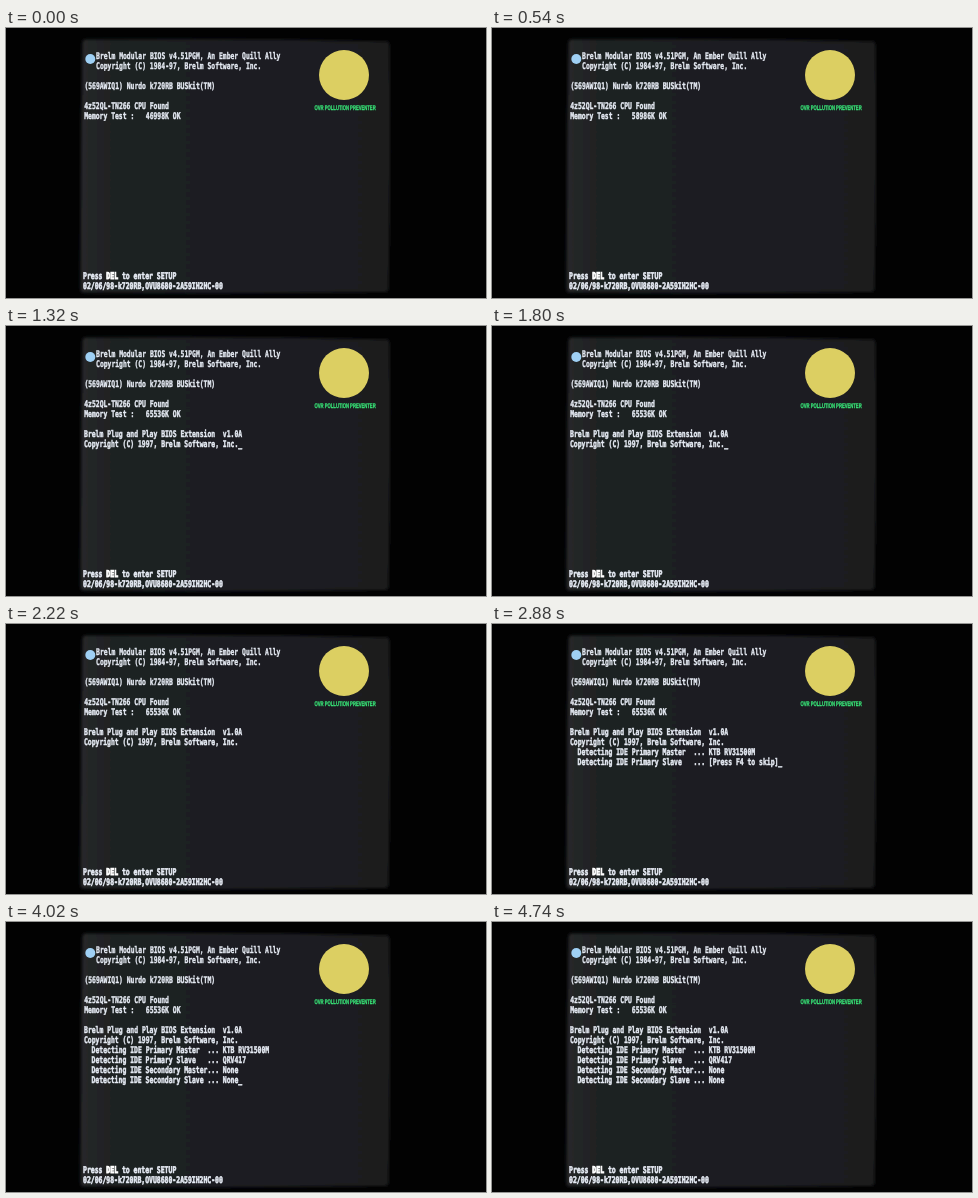
An HTML page that plays this animation: 480 px wide and 270 px high, repeating every 4.8 s.

```html
<!DOCTYPE html>
<html lang="en">
<head>
<meta charset="utf-8">
<title>Boot screen</title>
<style>
  html, body { margin: 0; width: 100%; height: 100%; overflow: hidden; background: #020202; }
  svg { display: block; width: 100vw; height: 100vh; }
  text { text-rendering: geometricPrecision; white-space: pre; }
  #lines text { font: bold 16.61px "DejaVu Sans Mono", monospace; fill: #e6ebf4; stroke: #e6ebf4; }
  #lines .hi { fill: #fff; stroke: #fff; stroke-width: 2px; }
  #label { font: bold 4.2px "Liberation Sans", Arial, sans-serif; fill: #38e678; stroke: #38e678; stroke-width: 0.2px; }
</style>
</head>
<body>
<svg viewBox="0 0 480 270">
  <defs>
    <filter id="soft" x="-5%" y="-5%" width="110%" height="110%">
      <feGaussianBlur stdDeviation="1.4"/>
    </filter>
    <linearGradient id="glass">
      <stop offset="0" stop-color="#26282a"/>
      <stop offset="0.12" stop-color="#1e2021"/>
      <stop offset="1" stop-color="#1c1d1f"/>
    </linearGradient>
  </defs>
  <rect width="480" height="270" fill="#020202"/>
  <path filter="url(#soft)" fill="url(#glass)"
    d="M79 11.5Q230 10 381 13.5Q383.5 14 383.5 18Q385 140 382.5 261Q382 264 378 264Q230 266 77 264.5Q74.5 264 74.5 260Q74.5 130 76.5 15Q76.5 12 79 11.5Z"/>
  <circle cx="84.3" cy="31" r="5" fill="#9fd0f4"/>
  <circle cx="338" cy="47" r="25" fill="#dccf62"/>
  <text id="label" transform="translate(308.5 81.9) scale(1 1.6)">OVR POLLUTION PREVENTER</text>
  <g id="lines"></g>
</svg>
<script>
const LOOP = 4800, FRAME = 60;
const MEM_START = 46998, MEM_END = 65536, MEM_RATE = 22.2;
const EXTENSION_AT = 1020;
const BLINK = 533, BLINK_SHIFT = 147;
const SKIP = "[Press F4 to skip]";

// Each drive is probed from start to end, then its result stays.
const drives = [
  { name: "Primary Master  ", found: "KTB RV31500M", start: 2460, end: 2700 },
  { name: "Primary Slave   ", found: "QRV417", start: 2700, end: 3300 },
  { name: "Secondary Master", found: "None", start: 3300, end: 3600 },
  { name: "Secondary Slave ", found: "None", start: 3600, end: 3840 }
];

const group = document.getElementById("lines");

// Rows widen, thicken and shift slightly left toward the bottom of the tube.
function addLine(row, text = "", indent = 0) {
  const el = document.createElementNS("http://www.w3.org/2000/svg", "text");
  const sx = 0.384 + row * 0.0002;
  const x = 78.6 - row * 0.07 + indent * sx * 10;
  const y = 30.7 + row * 10.03;
  el.setAttribute("transform", `translate(${x} ${y}) scale(${sx} 0.55)`);
  el.setAttribute("stroke-width", 0.7 + row * 0.025);
  el.textContent = text;
  group.append(el);
  return el;
}

addLine(0, "Brelm Modular BIOS v4.51PGM, An Ember Quill Ally", 3);
addLine(1, "Copyright (C) 1984-97, Brelm Software, Inc.", 3);
addLine(3, "(569AWIQ1) Nurdo k720RB BUSkit(TM)");
addLine(5, "4z52QL-TN266 CPU Found");
const memory = addLine(6);
const extension = addLine(8);
const rights = addLine(9);
const driveLines = drives.map((d, i) => addLine(10 + i));
addLine(22).innerHTML = 'Press <tspan class="hi">DEL</tspan> to enter SETUP';
addLine(23, "02/06/98-k720RB,OVU8680-2A59IH2HC-00");

function setText(el, text) {
  if (el.textContent !== text) el.textContent = text;
}

function draw(time) {
  const t = Math.floor((time % LOOP) / FRAME) * FRAME;
  const kb = Math.min(MEM_END, Math.round(MEM_START + t * MEM_RATE));
  const cursor = (t + BLINK_SHIFT + BLINK - 1320 % BLINK) % BLINK < BLINK / 2 ? "_" : "";
  const extended = t >= EXTENSION_AT;
  const active = drives.filter(d => t >= d.start).length;

  setText(memory, `Memory Test :   ${kb}K OK`);
  setText(extension, extended ? "Brelm Plug and Play BIOS Extension  v1.0A" : "");
  setText(rights, extended
    ? "Copyright (C) 1997, Brelm Software, Inc." + (active ? "" : cursor) : "");
  drives.forEach((d, i) => {
    const result = t >= d.end ? d.found : SKIP;
    const tail = i === active - 1 ? cursor : "";
    setText(driveLines[i], i < active ? `  Detecting IDE ${d.name}... ${result}${tail}` : "");
  });
}

const began = performance.now();
function tick() {
  draw(performance.now() - began);
  requestAnimationFrame(tick);
}
tick();
</script>
</body>
</html>
```
